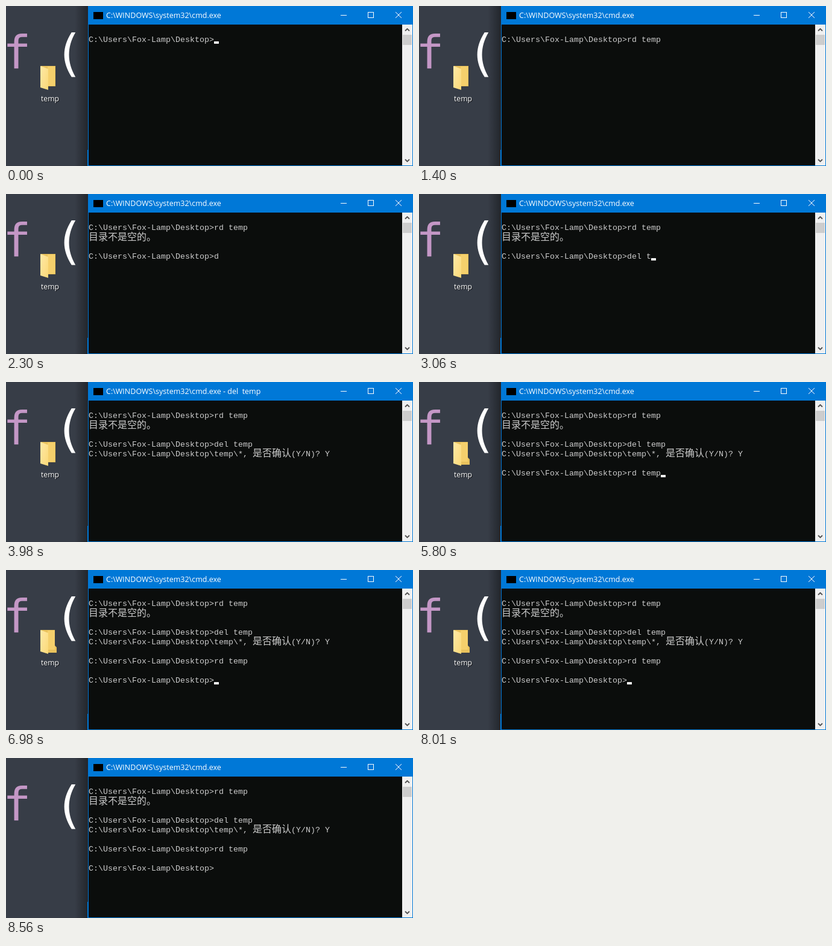
These frames come from a looping animation (675 px wide and 267 px high, 8590 ms). An HTML page:

```html
<!DOCTYPE html>
<html lang="zh">
<head>
<meta charset="utf-8">
<title>Console</title>
<style>
  html, body { margin: 0; width: 100%; height: 100%; overflow: hidden; background: #373d47; }
  svg { display: block; }
  text { white-space: pre; }
  .ui { font-family: "Open Sans", "Noto Sans", sans-serif; fill: #fff; }
  .con { font: 13.333px "Liberation Mono", monospace; fill: #ccc; }
  .han { font: 300 16px "Noto Sans CJK SC", "Noto Sans CJK", sans-serif; }
</style>
</head>
<body>
<svg width="675" height="267" viewBox="0 0 675 267">
  <defs>
    <linearGradient id="shade">
      <stop offset="0" stop-color="#000" stop-opacity="0"/>
      <stop offset="1" stop-color="#000" stop-opacity=".38"/>
    </linearGradient>
    <linearGradient id="flap" x2="1" y2="1">
      <stop offset="0" stop-color="#ffe9a6"/>
      <stop offset="1" stop-color="#fad978"/>
    </linearGradient>
  </defs>

  <!-- desktop -->
  <rect width="136" height="267" fill="#373d47"/>
  <text x="-5" y="104" font-size="77" fill="#c497c6" font-family="DejaVu Sans Mono, monospace">f</text>
  <text x="89.5" y="108" font-size="83" fill="#fff" font-family="DejaVu Sans, sans-serif">(</text>
  <rect x="114" width="22" height="267" fill="url(#shade)"/>
  <g id="folder">
    <path id="full" d="M58 100H82V134H70V139L58 135Z" fill="#e9c25c"/>
    <path id="empty" d="M58 100H81V126L84 129V138H70L58 135Z" fill="#e9c25c"/>
    <path d="M69 101H81V133H69Z" fill="#f5d06c"/>
    <path d="M57 100L70 105V140L57 136Z" fill="url(#flap)"/>
    <g class="ui" font-size="12.3" text-anchor="middle">
      <text x="74" y="160" fill="#000" style="fill:#000" opacity=".75">temp</text>
      <text x="73" y="159">temp</text>
    </g>
  </g>

  <!-- window -->
  <rect x="135" y="240" width="1" height="27" fill="#0078d7"/>
  <rect x="136" width="539" height="267" fill="#0078d7"/>
  <rect x="137" y="31" width="520" height="235" fill="#0b0d0c"/>
  <rect x="145" y="10" width="16" height="12" fill="#000"/>
  <text id="title" class="ui" x="166" y="20" font-size="12.5"></text>
  <g fill="none" stroke="#fff">
    <path d="M555 15.5H565"/>
    <rect x="600.5" y="10.5" width="9" height="9"/>
    <path d="M646 10L656 20M656 10L646 20"/>
  </g>
  <rect x="657" y="31" width="17" height="235" fill="#f0f0f0"/>
  <rect x="658" y="48" width="15" height="17" fill="#cdcdcd"/>
  <path d="M662 41.5L665.5 38L669 41.5M662 256L665.5 259.5L669 256" fill="none" stroke="#505050" stroke-width="1.8"/>

  <g id="lines" class="con"></g>
  <rect id="cursor" width="8" height="4" fill="#f2f2f2"/>
</svg>
<script>
const LOOP = 8590, LEFT = 137, TOP = 48, CELL = 8, ROW = 16;
const HOME = 'C:\\Users\\Fox-Lamp\\Desktop', PROMPT = HOME + '>';
const TITLE = 'C:\\WINDOWS\\system32\\cmd.exe';
const $ = id => document.getElementById(id);

// Each stage: row and column where input goes, row of its text, markup, and the finished input
const han = s => `<tspan class="han">${s}</tspan>`;
const ask = HOME + '\\temp\\*, ' + han('是否确认') + '(Y/N)? ';
const stages = [
  { row: 0, col: 26, text: PROMPT, done: 'rd temp' },
  { row: 3, col: 26, text: PROMPT, done: 'del temp' },
  { row: 4, col: 49, text: ask, done: 'Y' },
  { row: 6, col: 26, text: PROMPT, done: 'rd temp' },
  { row: 8, col: 26, text: PROMPT, done: '' }
];

// [time, stage, input, cursor on, title suffix]
const steps = [
  [0, 0, '', 1],
  [290, 0, 'r', 1], [430, 0, 'rd', 1], [570, 0, 'rd ', 1],
  [1060, 0, 'rd t', 0], [1090, 0, 'rd t', 1], [1240, 0, 'rd temp', 1], [1400, 0, 'rd temp', 0],
  [1500, 1, '', 1], [1910, 1, '', 0],
  [2300, 1, 'd', 0], [2320, 1, 'd', 1], [2450, 1, 'de', 1], [2580, 1, 'del', 0],
  [2600, 1, 'del', 1], [2760, 1, 'del ', 1], [3060, 1, 'del t', 1], [3220, 1, 'del temp', 1],
  [3460, 2, '', 0, ' - del  temp'], [3640, 2, '', 1, ' - del  temp'],
  [3980, 2, 'Y', 0, ' - del  temp'], [4000, 2, 'Y', 1, ' - del  temp'],
  [4330, 3, '', 1],
  [4980, 3, 'r', 0], [5010, 3, 'r', 1], [5130, 3, 'rd', 0], [5150, 3, 'rd', 1],
  [5290, 3, 'rd ', 1], [5520, 3, 'rd t', 0], [5540, 3, 'rd t', 1], [5800, 3, 'rd temp', 1],
  [6030, 3, 'rd temp', 0, ' - rd  temp'], [6050, 4, '', 1],
  [6570, 4, '', 0], [6980, 4, '', 1], [7490, 4, '', 0], [8010, 4, '', 1], [8510, 4, '', 0]
];

function line(row, markup, drop = 12) {
  return `<text x="${LEFT}" y="${TOP + row * ROW + drop}">${markup}</text>`;
}

let shown = null;
function draw(t) {
  $('folder').style.display = t < 8150 ? '' : 'none';
  $('full').style.display = t < 4330 ? '' : 'none';
  $('empty').style.display = t < 4330 ? 'none' : '';

  const step = steps.findLast(s => s[0] <= t);
  if (step === shown) return;
  shown = step;
  const [, stage, input, on, suffix = ''] = step;
  let out = stages.slice(0, stage + 1)
    .map((s, i) => line(s.row, s.text + (i < stage ? s.done : input))).join('');
  if (stage > 0) out += line(1, han('目录不是空的。'), 13);
  $('lines').innerHTML = out;
  $('title').textContent = TITLE + suffix;

  const at = stages[stage], cursor = $('cursor');
  cursor.setAttribute('x', LEFT + (at.col + input.length) * CELL);
  cursor.setAttribute('y', TOP + at.row * ROW + 11);
  cursor.style.display = on ? '' : 'none';
}

const start = performance.now();
function tick() {
  draw((performance.now() - start) % LOOP);
  requestAnimationFrame(tick);
}
tick();
</script>
</body>
</html>
```
